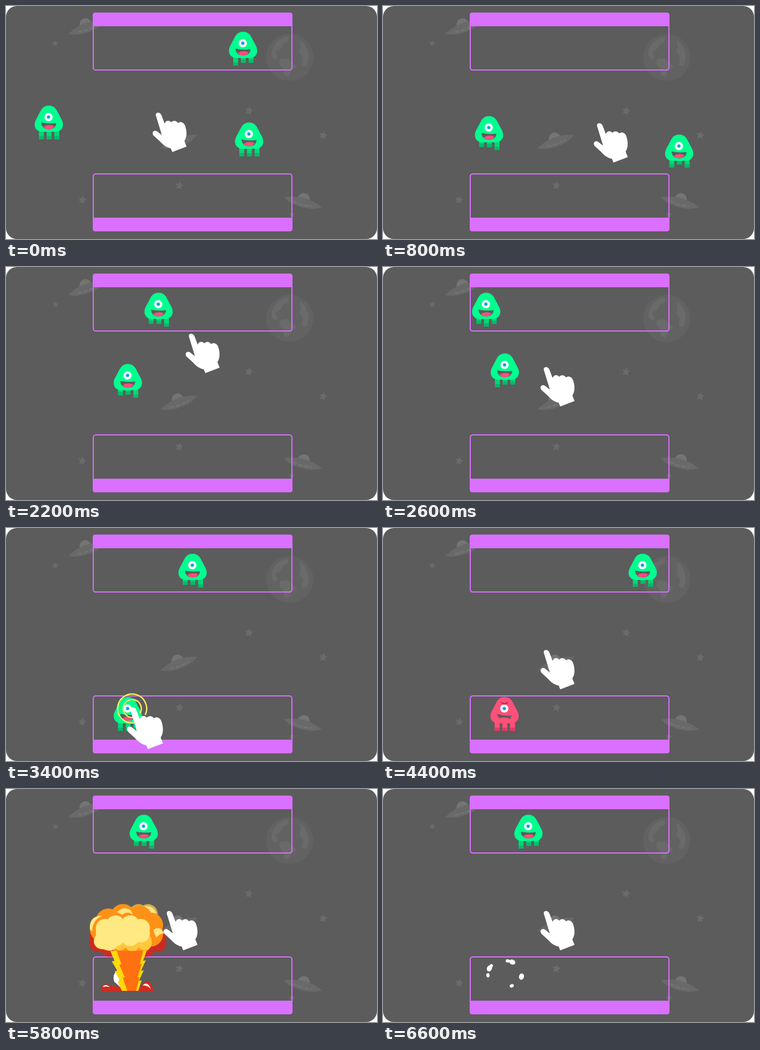
An HTML page that plays this animation: 676 by 426 pixels, repeating every 6800 ms.

```html
<!DOCTYPE html>
<html lang="en">
<head>
<meta charset="utf-8">
<title>Alien sorting</title>
<style>
  html, body { margin: 0; width: 100%; height: 100%; overflow: hidden; background: #fff; }
  svg { display: block; width: 676px; height: 426px; }
</style>
</head>
<body>
<svg viewBox="0 0 676 426">
  <defs>
    <path id="star" fill="#6b6b6b" d="M0-8 2.4-2.8 8-2.2 4 1.8 5 7.5 0 5-5 7.5-4 1.8-8-2.2-2.4-2.8Z"/>
    <g id="ufo">
      <circle cy="-6" r="11" fill="#747474"/>
      <path fill="#696969" d="M-36 0C-22-6-12-8 0-8S22-6 36 0C22 8 11 9 0 9S-22 8-36 0Z"/>
      <path fill="none" stroke="#737373" stroke-width="3" stroke-dasharray="8 3" d="M-18 2Q0 7 18 2"/>
    </g>
  </defs>

  <rect width="676" height="426" rx="20" fill="#5c5c5c"/>
  <circle cx="517" cy="94" r="43" fill="#626262"/>
  <g fill="#6a6a6a">
    <path d="M484 92C482 74 496 58 515 56L513 65 505 69 499 79 490 84 496 94 489 98Z"/>
    <path d="M535 62C550 71 556 92 547 110L539 108 541 93 534 84 537 75Z"/>
    <path d="M499 97 513 95 529 111 520 118 514 129 506 126 506 115 498 107Z"/>
  </g>
  <use href="#ufo" transform="translate(147 39) rotate(-20)"/>
  <use href="#ufo" transform="translate(315 248) rotate(-20)"/>
  <use href="#ufo" transform="translate(541 359) rotate(15)"/>
  <g id="stars"></g>

  <g fill="none" stroke="#d970ff" stroke-width="2">
    <rect x="159" y="13" width="362" height="104" rx="4.5"/>
    <rect x="159" y="307" width="362" height="104" rx="4.5"/>
  </g>
  <g fill="#d970ff">
    <path d="M158 37V17Q158 12 163 12H517Q522 12 522 17V37Z"/>
    <path d="M158 387V407Q158 412 163 412H517Q522 412 522 407V387Z"/>
  </g>

  <g id="aliens"></g>
  <g id="blast"></g>
  <g id="puffs" fill="#fff"></g>

  <g id="ring" fill="none" stroke="#ffee5c" stroke-width="2.4" stroke-linecap="round">
    <path d="M24 11A26.500 26.500 0 1 0 2 26.500"/>
    <path d="M14.500 8A16.500 16.500 0 1 0 1 16.500"/>
  </g>
  <path id="hand" fill="#fff" d="M-5 5C-6-1 2-2 5 4L11 20C13 14 20 13 23 18 26 13 34 15 35 19
    40 15 46 18 48 23 51 31 53 43 47 52L51 62 25 72 22 65C15 64 8 59 3 53L-9 42C-14 36-8 31-3 34L6 41Z"/>
</svg>

<script>
const STEP = 200, STEPS = 34, TOP_Y = 47;
const $ = id => document.getElementById(id);
const show = (el, on) => el.setAttribute('display', on ? 'inline' : 'none');
const move = (el, x, y, s = 1) => el.setAttribute('transform', `translate(${x} ${y}) scale(${s})`);
const mix = (a, b, f) => a + (b - a) * f;

// Key points are [step, x, y], with straight moves between them.
function at(keys, k) {
  const i = keys.findIndex(p => p[0] > k);
  if (i < 0) return keys[keys.length - 1].slice(1);
  const [a, b] = [keys[i - 1], keys[i]];
  const f = (k - a[0]) / (b[0] - a[0]);
  return a.slice(1).map((v, j) => mix(v, b[j + 1], f));
}

const handKeys = [[0, 278, 195], [1, 278, 195], [6, 473, 227], [9, 378.5, 61], [13, 298, 183],
  [15, 232, 175], [17, 232, 327], [18, 232, 326], [22, 298, 223]];
const stray = [[0, 443, 213], [3, 578, 248], [6, 463, 209]];
const patrol = [[9, 368], [13, 188], [17, 340], [18, 394], [23, 493], [29, 251], [31, 188], [33, 265]];
const drift = [[0, 78, 182], [5, 222, 206], [8, 222, 206], [13, 222, 158], [15, 222, 157]];

function held(k) {
  const [x, y] = at(handKeys, k);
  return [x - 10, y - 18];
}

const faces = {
  happy: `<path fill="#5c5c5c" d="M-14 31Q0 34 13.500 32C13 40 7 43.500 0 43.500S-13 40-14 31Z"/>
    <path fill="#ff4d7d" d="M-10 39Q0 33 10 38Q6 43.500 0 43.500T-10 39Z"/>`,
  angry: `<path fill="#c92f57" d="M-7 8Q-3 11 0 11T7 8Q6 14 0 14T-7 8Z"/>
    <path fill="#5c5c5c" d="M-14 31Q0 35 13 34L10 40Q0 35-10 39Z"/>`
};

function alien(face, skin, leg, foot) {
  const g = document.createElementNS('http://www.w3.org/2000/svg', 'g');
  const legs = [-18, -4, 10].map(x => `<g class="leg">
    <rect x="${x}" y="38" width="9" height="24" rx="1" fill="${leg}"/>
    <rect x="${x}" y="56" width="9" height="6" rx="1" fill="${foot}"/></g>`).join('');
  g.innerHTML = `${legs}
    <path fill="${skin}" d="M0 0C6 0 11 3 14 8L23.500 26C29 37 24 48 12 48H-12C-24 48-29 37-23.500 26L-14 8C-11 3-6 0 0 0Z"/>
    <circle cx="-.5" cy="21" r="7.500" fill="#fff"/>
    <circle cx="-.5" cy="21" r="3" fill="#0c9cf2"/>${faces[face]}`;
  $('aliens').append(g);
  g.legs = [...g.querySelectorAll('.leg')];
  return g;
}

function walk(g, phase, on) {
  g.legs.forEach((leg, i) => {
    const lift = on ? 3.5 * (1 - Math.cos(2 * Math.PI * (phase - i / 3))) : 0;
    move(leg, 0, -lift);
  });
}

const shape = (fill, d) => `<path fill="${fill}" d="${d}"/>`;
const oval = (fill, x, y, rx, ry = rx) =>
  `<ellipse cx="${x}" cy="${y}" rx="${rx}" ry="${ry}" fill="${fill}"/>`;

// A filled oval with n round lobes on its rim.
function cloud(fill, x, y, rx, ry, n, r) {
  let out = oval(fill, x, y, rx + r / 2, ry + r / 2);
  for (let i = 0; i < n; i++) {
    const a = (i + .5) / n * 2 * Math.PI;
    out += oval(fill, x + rx * Math.cos(a), y + ry * Math.sin(a), r);
  }
  return out;
}

// A tapering column with jagged sides, half as wide at the foot.
function bolt(fill, x, half, foot, jag, teeth) {
  const left = [], right = [];
  for (let i = 0; i <= teeth; i++) {
    const f = i / teeth, y = mix(296, 369, f), w = mix(half, foot, f);
    const cx = mix(x, x + 3, f), j = i % teeth ? jag : 0;
    left.push([cx - w + j, y], [cx - w - j, y + j / 4]);
    right.unshift([cx + w + j, y - j / 2], [cx + w - j, y]);
  }
  return shape(fill, 'M' + left.concat(right).join('L') + 'Z');
}

$('blast').innerHTML =
  cloud('#c92c20', 222, 277, 57, 17, 10, 16) +
  cloud('#d7ad4c', 250, 230, 12, 2, 4, 18) +
  cloud('#ffe680', 250, 232, 10, 1, 4, 17) +
  cloud('#ff9116', 221, 257, 45, 24, 9, 23) +
  shape('#ffe680', 'M153 257C151 240 160 231 175 232Q158 239 157 260ZM202 225Q211 217 218 218 229 219 231 230 221 222 212 230ZM268 258Q281 248 288 264 279 264 274 272Z') +
  cloud('#ffc83d', 230, 280, 26, 4, 6, 13) +
  cloud('#ffe983', 213, 259, 35, 12, 8, 17) +
  cloud('#ffe983', 184, 278, 9, 3, 3, 15) +
  shape('#fff', 'M203 331Q193 340 197 352L210 364Z') +
  shape('#d32a20', 'M173 371V363Q181 353 191 360L204 361 212 365H240L248 359Q256 345 265 357L270 371Z') +
  shape('#fff', 'M176 362Q181 355 189 362L182 361ZM249 359Q258 350 264 366 259 359 249 359Z') +
  bolt('#ffd90a', 223, 33, 15, 2.5, 4) +
  bolt('#ff7010', 226, 24, 8, 2, 3);

$('stars').innerHTML = [[90, 68], [443, 191], [578, 236], [316, 328], [139, 354], [521, 381]]
  .map(([x, y], i) => `<use href="#star" transform="translate(${x} ${y}) rotate(10) scale(${i % 5 ? .95 : .7})"/>`)
  .join('');

function puffs(size) {
  return [12, 66, 174, 205, 216, 280, 296].map((deg, i) => {
    const a = deg * Math.PI / 180;
    const x = 222 + 31 * Math.cos(a), y = 338 + 24 * Math.sin(a);
    const r = (i % 3 ? 3 : 4.5) * size;
    return `<ellipse rx="${r}" ry="${r * 1.3}" transform="translate(${x} ${y}) rotate(${deg})"/>`;
  }).join('');
}

const green = ['#00ff90', '#00d676', '#00bb66'];
const guest = alien('happy', ...green);
const victim = alien('happy', ...green);
const walker = alien('happy', ...green);
const angry = alien('angry', '#ff5079', '#ff5079', '#e23a63');

function draw(k) {
  show(guest, k === 0);
  move(guest, 432, TOP_Y);
  walk(guest, 0, true);

  const place = k < 6 ? at(stray, k) : k < 9 ? held(k) : [...at(patrol, k), TOP_Y];
  move(walker, ...place);
  walk(walker, .5 - k / 6, k > 0 && k < 6 || k > 8);

  const spot = k < 15 ? at(drift, k) : held(Math.min(k, 17));
  show(victim, k < 19);
  move(victim, ...spot);
  walk(victim, .25 + .15 * (k - 8), k > 0 && k < 15);
  show(angry, k >= 19 && k < 24);
  move(angry, spot[0] - .5, spot[1]);

  const s = Math.min(1, .4 + .43 * (k - 23));
  show($('blast'), k >= 23 && k < 30);
  move($('blast'), 221 * (1 - s), 371 * (1 - s), s);
  $('puffs').innerHTML = k >= 30 ? puffs(34 - k) : '';

  const [x, y] = at(handKeys, k);
  const pressed = k >= 6 && k <= 9 || k >= 15 && k <= 17;
  show($('ring'), pressed);
  move($('ring'), x - 2, y + 3);
  move($('hand'), x, pressed ? y + 1 : y, pressed ? 1.06 : 1);
}

let last = -1;
function tick() {
  const k = Math.floor(performance.now() / STEP) % STEPS;
  if (k !== last) draw(last = k);
  requestAnimationFrame(tick);
}
tick();
</script>
</body>
</html>
```
